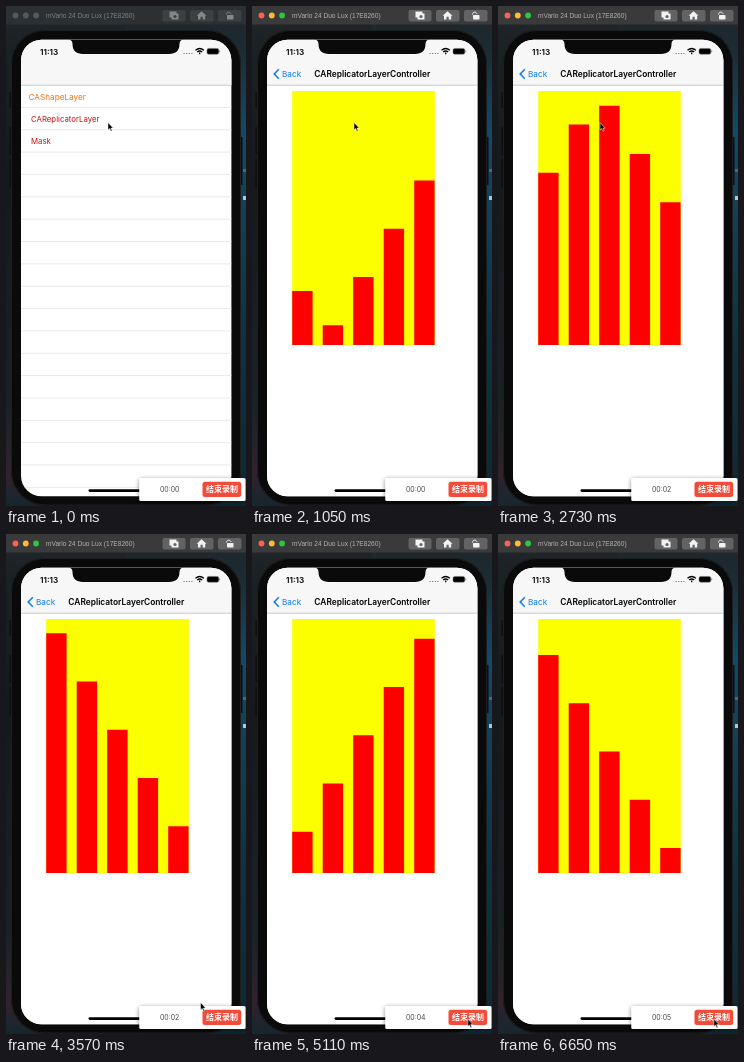
These frames come from a looping animation (240x500 px, 6720 ms). An HTML page:

```html
<!DOCTYPE html>
<html lang="en">
<head>
<meta charset="utf-8">
<title>Replicator bars</title>
<style>
html, body { margin: 0; width: 100%; height: 100%; overflow: hidden; background: #15181c; }
svg { display: block; width: 240px; height: 500px; font-family: Inter, "Liberation Sans", sans-serif; }
.bar-bg { fill: #3a3a3b; }
.key { fill: #626365; }
.icon { fill: none; stroke: #f2f2f2; stroke-width: 1; }
.solid { fill: #f2f2f2; stroke: none; }
#title { fill: #b0b0b2; font: 6.6px "Liberation Sans", Arial, sans-serif; }
.idle .bar-bg { fill: #2c3032; }
.idle .key { fill: #3b4042; }
.idle .icon { stroke: #85888a; }
.idle .solid { fill: #85888a; }
.idle #title { fill: #7d8082; }
.idle .light { fill: #55595b; }
</style>
</head>
<body>
<svg viewBox="0 0 240 500">
  <defs>
    <linearGradient id="left" x2="0" y2="1">
      <stop offset="0" stop-color="#20262a"/><stop offset=".08" stop-color="#1c2224"/>
      <stop offset=".35" stop-color="#15191c"/><stop offset=".8" stop-color="#1b2226"/>
      <stop offset=".94" stop-color="#30222f"/><stop offset="1" stop-color="#14272d"/>
    </linearGradient>
    <linearGradient id="right" x2="0" y2="1">
      <stop offset="0" stop-color="#20262a"/><stop offset=".08" stop-color="#1c2a32"/>
      <stop offset=".25" stop-color="#134a66"/><stop offset=".42" stop-color="#133f54"/>
      <stop offset=".65" stop-color="#0c3444"/><stop offset="1" stop-color="#0e2733"/>
    </linearGradient>
    <clipPath id="screen"><rect x="15" y="33.800" width="210.400" height="456.500" rx="20.500"/></clipPath>
    <clipPath id="page"><rect x="15" y="79" width="211" height="412"/></clipPath>
    <filter id="shadow" x="-10%" y="-40%" width="120%" height="180%">
      <feDropShadow dx="0" dy="1" stdDeviation="2.2" flood-opacity=".5"/>
    </filter>
  </defs>

  <rect width="120" height="500" fill="url(#left)"/>
  <rect x="120" width="120" height="500" fill="url(#right)"/>
  <path d="M237 163h3v3h-3z" fill="#7a5a48"/>
  <path d="M237 190h3v4h-3z" fill="#b8c4cc"/>

  <g id="window" class="idle">
    <rect class="bar-bg" width="240" height="18.500"/>
    <circle class="light" cx="9.500" cy="9.500" r="2.900" fill="#ff5f57"/>
    <circle class="light" cx="19.800" cy="9.500" r="2.900" fill="#febc2e"/>
    <circle class="light" cx="30.100" cy="9.500" r="2.900" fill="#28c840"/>
    <text id="title" x="40" y="12">mVarlo 24 Duo Lux (17E8260)</text>
    <rect class="key" x="156.500" y="4" width="23" height="11.500" rx="2"/>
    <rect class="key" x="184" y="4" width="23.500" height="11.500" rx="2"/>
    <rect class="key" x="212" y="4" width="23.500" height="11.500" rx="2"/>
    <path class="solid" d="M163.500 5.500h7v2h2v6h-7v-2h-2z"/>
    <circle class="key" cx="169" cy="10.500" r="1.600"/>
    <path class="solid" d="M195.500 5.300L200.500 9.700H199.200V13.500H196.700V10.800H194.500V13.500H192V9.700H190.700z"/>
    <rect class="solid" x="221" y="9" width="6.500" height="4.500" rx=".7"/>
    <path class="icon" d="M220.500 8.500C220.500 5.500 224.500 5.500 225 8"/>
  </g>

  <path d="M3.500 86h2v16h-2zM3.500 121h2v28h-2zM3.500 153h2v29h-2zM234.500 131h2v48h-2z" fill="#0c0e10"/>
  <rect x="5" y="24" width="230" height="475.500" rx="34" fill="#0a0a0b"/>
  <rect x="5.500" y="24.500" width="229" height="474.500" rx="33.500" fill="none" stroke="#1d1e20"/>

  <g clip-path="url(#screen)">
    <rect x="15" y="33" width="211" height="458" fill="#fff"/>
    <g clip-path="url(#page)">
      <g id="list">
        <rect id="pressed" x="15" y="101.500" width="211" height="22.300" fill="#d9d9da"/>
        <path id="rules" stroke="#e0e0e1" stroke-width=".7"/>
        <text x="22.500" y="93.600" font-size="8.200" fill="#ee7411">CAShapeLayer</text>
        <g font-size="7.800" fill="#cc1111">
          <text x="25" y="115.600">CAReplicatorLayer</text>
          <text x="25" y="137.900">Mask</text>
        </g>
      </g>
      <rect id="dim" x="15" y="79" width="211" height="412"/>
      <g id="detail">
        <rect x="15" y="79" width="211" height="412" fill="#fff"/>
        <rect x="40.200" y="85" width="142.600" height="254" fill="#fcff00"/>
        <path id="bars" fill="#f00"/>
      </g>
    </g>
    <rect x="15" y="33" width="211" height="46" fill="#f7f7f7"/>
    <path d="M15 79.200h211" stroke="#b5b5b7" stroke-width=".7"/>
    <text id="heading" x="120.300" y="71" text-anchor="middle" font-size="8.400" font-weight="600">CAReplicatorLayerController</text>
    <g id="back">
      <path d="M26.800 63.200L22.200 68L26.800 72.800" fill="none" stroke="#0a78f5" stroke-width="1.500"/>
      <text id="backText" x="30" y="71" font-size="8.200" fill="#0a78f5">Back</text>
    </g>
    <path d="M62 33C65 34 66.500 35 66.500 38C66.500 44.500 70 47.900 77 47.900H163C170 47.900 173.500 44.500 173.500 38C173.500 35 175 34 178 33z" fill="#0a0a0b"/>
    <text x="34" y="48.500" font-size="8.200" font-weight="600">11:13</text>
    <path d="M177.500 47.500h9" stroke="#777" stroke-width="1.200" stroke-dasharray="1.200 1.400"/>
    <g fill="none" stroke="#000" stroke-width="1.300">
      <path d="M189.500 44.200Q193.700 40.800 197.900 44.200M191.200 46Q193.700 44 196.200 46"/>
      <path d="M193.700 46.500v1.700"/>
    </g>
    <rect x="201" y="42.400" width="11.800" height="5.800" rx="1.600" fill="#000" stroke="#777" stroke-width=".5"/>
    <path d="M213.700 44.300v2" stroke="#777" stroke-width=".8"/>
    <rect x="82.500" y="483.300" width="75" height="2.600" rx="1.300" fill="#000"/>
  </g>

  <rect x="133.300" y="472" width="106.200" height="23" rx="1.500" fill="#fff" filter="url(#shadow)"/>
  <text id="clock" x="154" y="486" font-size="6.900" fill="#444"></text>
  <rect x="196.500" y="475.800" width="38.700" height="15.200" rx="2.500" fill="#f24b3a"/>
  <text x="215.900" y="486.400" text-anchor="middle" fill="#fff" style="font:700 8px 'Noto Sans CJK SC','Noto Sans CJK',sans-serif">结束录制</text>

  <path id="cursor" d="M0 0V7.500L1.700 6L2.900 8.700L4.100 8.200L2.900 5.600H5.200z" stroke="#fff" stroke-width=".5"/>
</svg>
<script>
const $ = id => document.getElementById(id);
const LOOP = 6720, STEP = 70, CYCLE = 15;
const FULL = 254, LOW = 12.7, TRAVEL = FULL - LOW, BASE = 339;

// Distance travelled by the first bar through one capture cycle
const phaseKeys = [[0, 41.3], [5, 205.3], [6, 227], [12, 419.3], [15, 523.9]];
const cursorKeys = [[42, 102, 116.5], [51, 194.5, 468.5], [55, 215.8, 485]];

const clamp = v => Math.min(1, Math.max(0, v));

function track(keys, x, column = 1) {
  let i = 1;
  while (i < keys.length - 1 && x > keys[i][0]) i++;
  const a = keys[i - 1], b = keys[i];
  return a[column] + (b[column] - a[column]) * clamp((x - a[0]) / (b[0] - a[0]));
}

function barHeight(phase) {
  if (phase < -TRAVEL) return FULL;
  const p = (phase + 2 * TRAVEL) % (2 * TRAVEL);
  return LOW + TRAVEL - Math.abs(TRAVEL - p);
}

function barsPath(tick) {
  const lap = Math.floor(tick / CYCLE) - 1;
  const phase = track(phaseKeys, tick % CYCLE) + lap * 2 * TRAVEL;
  let d = "";
  for (let i = 0; i < 5; i++) {
    const h = barHeight(phase - i * TRAVEL / 5);
    d += `M${40.2 + 30.5 * i} ${BASE}v${-h}h20.4v${h}z`;
  }
  return d;
}

const shift = (id, x, y = 0) => $(id).setAttribute("transform", `translate(${x} ${y})`);

function draw(ms) {
  const tick = Math.floor(ms % LOOP / STEP);
  const push = 1 - (1 - clamp((tick - 6) / 7)) ** 3;

  $("window").setAttribute("class", tick < 2 ? "idle" : "");
  $("pressed").setAttribute("opacity", tick < 4 ? 0 : 1);
  shift("list", -63 * push);
  shift("detail", 211 * (1 - push));
  shift("heading", 105 * (1 - push));
  shift("backText", 60 * (1 - push));
  $("dim").setAttribute("opacity", 0.1 * push);
  $("heading").setAttribute("opacity", push);
  $("back").setAttribute("opacity", push);
  $("bars").setAttribute("d", barsPath(tick));

  const seconds = Math.max(0, Math.floor((tick - 9) / CYCLE));
  $("clock").textContent = "00:0" + seconds;
  shift("cursor", track(cursorKeys, tick, 1), track(cursorKeys, tick, 2));
}

let rules = "";
for (let y = 101.4; y < 490; y += 22.35) rules += `M15 ${y}h211`;
$("rules").setAttribute("d", rules);

const start = performance.now();
function loop() {
  draw(performance.now() - start);
  requestAnimationFrame(loop);
}
loop();
</script>
</body>
</html>
```
